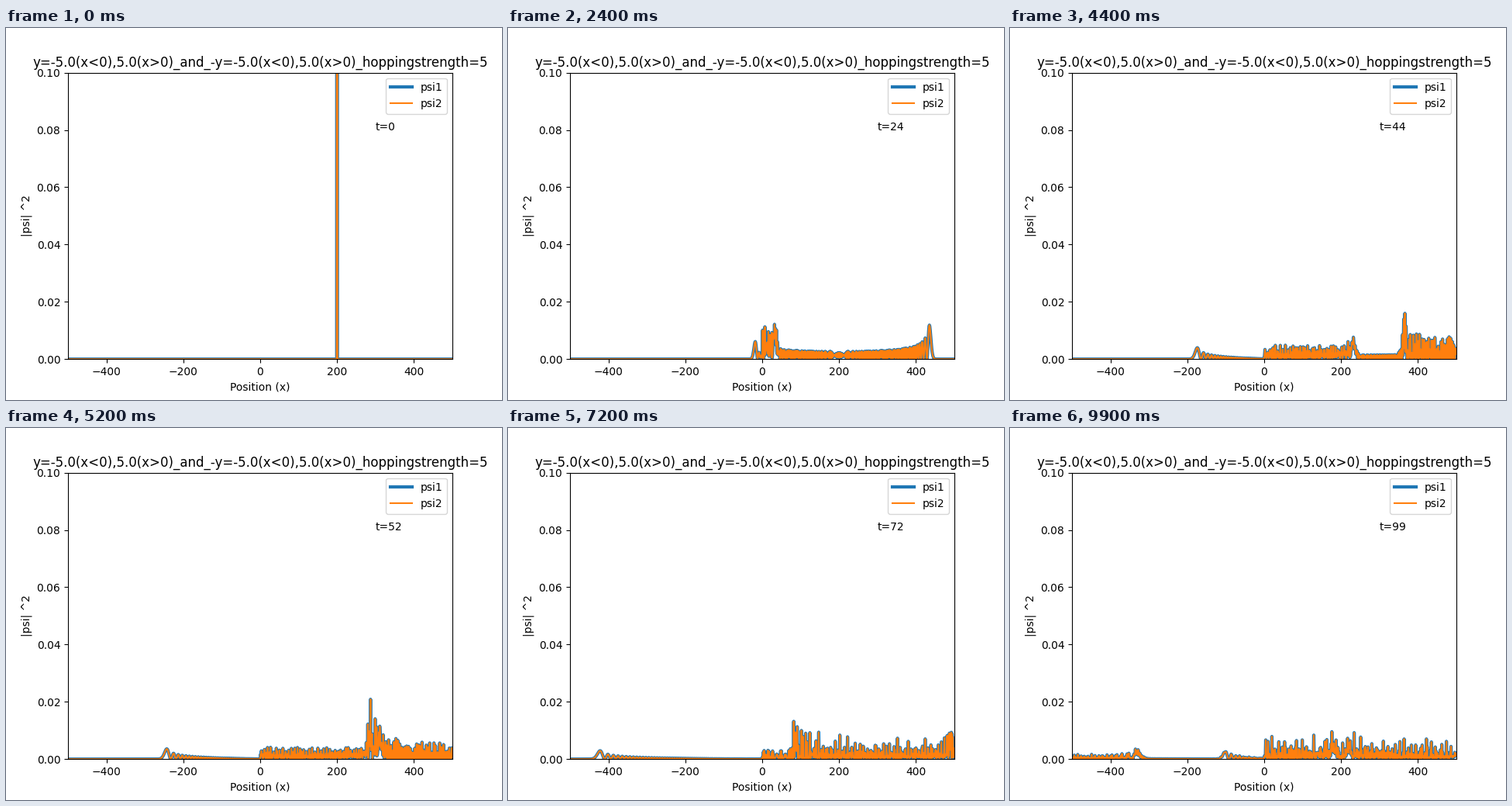
Recreate the animation shown at these times as a matplotlib script. Size 640x480 px, loop 10 s.

```python
import numpy as np
import matplotlib.pyplot as plt
from matplotlib.animation import FuncAnimation

SITES = 1000
FRAMES = 100
HOP = 5.0
STEP = 5.0
START = 200

x = np.arange(SITES) - SITES // 2


def evolve():
    """Probability density on the chain at t = 0, 1, ... FRAMES - 1."""
    link = np.full(SITES - 1, HOP)
    h = np.diag(np.where(x < 0, -STEP, STEP))
    h += np.diag(link, 1) + np.diag(link, -1)
    energy, modes = np.linalg.eigh(h)
    weights = modes[x == START][0]
    phases = np.exp(-1j * np.outer(energy, np.arange(FRAMES)))
    psi = modes @ (weights[:, None] * phases)
    return np.abs(psi.T) ** 2


# Flipping the sign of the potential leaves the density unchanged,
# so both curves share the same values.
density = evolve()

fig, ax = plt.subplots(figsize=(6.4, 4.8), dpi=100)
ax.set_xlim(-500, 500)
ax.set_ylim(0, 0.1)
ax.set_xlabel("Position (x)")
ax.set_ylabel("|psi| ^2")
ax.set_title("y=-5.0(x<0),5.0(x>0)_and_-y=-5.0(x<0),5.0(x>0)_hoppingstrength=5")

wide, = ax.plot(x, density[0], lw=3, color="C0", label="psi1")
thin, = ax.plot(x, density[0], lw=1.5, color="C1", label="psi2")
clock = ax.text(300, 0.08, "t=0")
ax.legend(loc="upper right")


def draw(t):
    wide.set_ydata(density[t])
    thin.set_ydata(density[t])
    clock.set_text(f"t={t}")
    return wide, thin, clock


anim = FuncAnimation(fig, draw, frames=FRAMES, interval=100,
                     repeat=True, repeat_delay=0)
plt.show()
```
